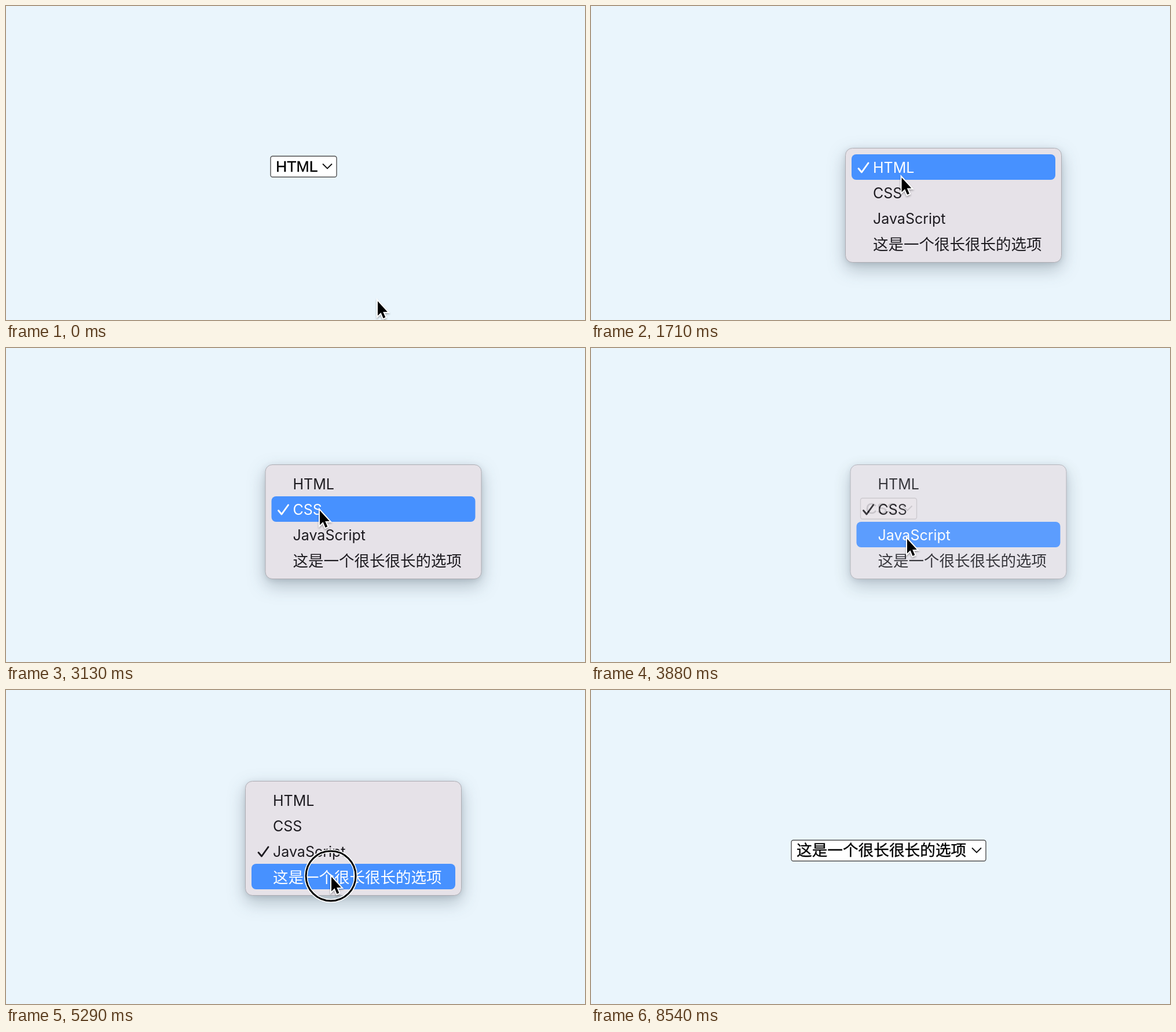
An HTML page for the animation above (8580 ms loop, 1000 px wide and 542 px high).

```html
<!DOCTYPE html>
<html lang="zh-CN">
<head>
<meta charset="utf-8">
<title>Select width</title>
<style>
  html, body { margin: 0; width: 100%; height: 100%; overflow: hidden; background: #eaf5fc; }
  svg { display: block; width: 1000px; height: 542px; }
  .box { fill: #fff; }
  .select text {
    font: 26.67px "Liberation Sans", "Noto Sans CJK SC", Arial, sans-serif;
    stroke: #000; stroke-width: .35;
  }
  .chevron { fill: none; stroke: #111; stroke-width: 1.8; }
  .ring { fill: none; stroke: #0053c3; stroke-width: 4; }
  .halo { fill: none; stroke: #fff; stroke-width: 6; }
  .panel {
    fill: #e6e2e8; stroke: #aeadb3;
    filter: drop-shadow(0 2px 4px rgba(30, 45, 60, .12)) drop-shadow(0 11px 15px rgba(30, 45, 60, .28));
  }
  .row rect { fill: none; }
  .row text { font: 25px Inter, "Noto Sans CJK SC", sans-serif; fill: #1d1b20; }
  .row text.cjk { font: 26.5px "Noto Sans CJK SC", sans-serif; }
  .row path { fill: none; stroke: #1d1b20; stroke-width: 2.9; stroke-linecap: round; stroke-linejoin: round; }
  .row.on rect { fill: #4791ff; }
  .row.on text { fill: #fff; }
  .row.on path { stroke: #fff; }
  .press { fill: none; }
  .pointer { filter: drop-shadow(0 2px 1.5px rgba(0, 0, 0, .3)); }
</style>
</head>
<body>
<svg viewBox="0 0 1000 542">
  <g class="select">
    <rect class="halo" y="260" height="34" rx="6"/>
    <rect class="box" y="259.2" height="36" rx="3.5" stroke-width="1.4"/>
    <rect class="ring" y="260" height="34" rx="5"/>
    <text y="286"></text>
    <path class="chevron" d="M-24.5 272.5l8 8 8-8"/>
  </g>
  <g id="menus"></g>
  <g id="cursor">
    <g class="press">
      <circle r="43" stroke="#fff" stroke-width="6"/>
      <circle r="43" stroke="#000" stroke-width="3"/>
    </g>
    <path class="pointer" d="M1 1.5V26.5L6.5 21.3 10.6 30.9 14.3 29.3 10.2 19.9H17.8Z"
      stroke="#fff" stroke-width="4" paint-order="stroke"/>
  </g>
</svg>
<script>
const LOOP = 8580, ROW = 44, CENTER = 514;
const options = [
  { label: 'HTML', width: 115 },
  { label: 'CSS', width: 98 },
  { label: 'JavaScript', width: 167 },
  { label: '这是一个很长很长的选项', width: 337, cjk: true }
];

// Each menu opens on the current option and fades once the next one is chosen.
const menus = [
  { open: 1160, fade: 2040 },
  { open: 2760, fade: 3855 },
  { open: 4530, fade: 5500 }
];
const FADE = 200, BLUR = 6540, HIDE = 7430;
const presses = [[1100, 1200], [1900, 1990], [2700, 2800], [3600, 3700],
  [4470, 4560], [5240, 5340], [6460, 6570]];

// Pointer moves: start, end, x, y
const START = [641, 508];
const moves = [
  [500, 1040, 529, 277],
  [1540, 1880, 542, 312],
  [2300, 2620, 541, 279],
  [3150, 3500, 545, 328],
  [4100, 4400, 553, 279],
  [4750, 5120, 561, 321],
  [5760, 6380, 705, 177],
  [6630, 7050, 791, 88]
];

const $ = selector => document.querySelector(selector);
const clamp = v => Math.min(1, Math.max(0, v));
const ease = v => v * v * (3 - 2 * v);
const within = (t, from, to) => t >= from && t < to;
const show = (node, on) => node.setAttribute('visibility', on ? 'visible' : 'hidden');
const leftOf = option => CENTER - option.width / 2;

function rowMarkup(option, index, checked) {
  const baseline = option.cjk ? 33 : 32;
  return `<g class="row" transform="translate(0 ${10 + index * ROW})">
    <rect x="10.5" width="352" height="${ROW}" rx="8"/>
    ${checked ? '<path d="M22.5 24.5l5.5 6.5 11.5-16"/>' : ''}
    <text class="${option.cjk ? 'cjk' : ''}" x="47.5" y="${baseline}">${option.label}</text>
  </g>`;
}

menus.forEach((menu, i) => {
  menu.top = 246 - i * ROW;
  $('#menus').insertAdjacentHTML('beforeend',
    `<g transform="translate(${leftOf(options[i]) - 17} ${menu.top})">
      <rect class="panel" y="-.5" width="373" height="197" rx="12"/>
      ${options.map((option, k) => rowMarkup(option, k, k === i)).join('')}
    </g>`);
  menu.node = $('#menus').lastElementChild;
  menu.rows = menu.node.querySelectorAll('.row');
});

function pointerAt(t) {
  let [x, y] = START;
  for (const [from, to, endX, endY] of moves) {
    const k = ease(clamp((t - from) / (to - from)));
    x += (endX - x) * k;
    y += (endY - y) * k;
  }
  return [x, y];
}

function drawSelect(t) {
  const chosen = menus.filter(menu => t >= menu.fade + FADE).length;
  const option = options[chosen];
  const left = leftOf(option);
  const opened = chosen < menus.length && t >= menus[chosen].open;
  const pressed = chosen < menus.length && t >= menus[chosen].open - 60;
  const ringed = chosen > 0 && !pressed && t < BLUR;

  const box = $('.box');
  box.setAttribute('x', left + .5);
  box.setAttribute('width', option.width - 1);
  box.setAttribute('stroke', opened ? '#282828' : '#505050');
  for (const node of [$('.ring'), $('.halo')]) {
    node.setAttribute('x', left + 1.5);
    node.setAttribute('width', option.width - 3);
    show(node, ringed);
  }
  const text = $('.select text');
  text.textContent = option.label;
  text.setAttribute('x', left + 9.5);
  $('.chevron').setAttribute('transform', `translate(${left + option.width} 0)`);
}

function render(t) {
  const [x, y] = pointerAt(t);
  drawSelect(t);
  for (const { node, rows, top, open, fade } of menus) {
    show(node, within(t, open, fade + FADE));
    node.setAttribute('opacity', 1 - clamp((t - fade) / FADE));
    const active = Math.floor((y - top - 10) / ROW);
    rows.forEach((row, k) => row.classList.toggle('on', k === active));
  }
  $('#cursor').setAttribute('transform', `translate(${x} ${y})`);
  $('#cursor').setAttribute('display', t < HIDE ? 'inline' : 'none');
  show($('.press'), presses.some(([from, to]) => within(t, from, to)));
}

const begin = performance.now();
function frame() {
  render((performance.now() - begin) % LOOP);
  requestAnimationFrame(frame);
}
frame();
</script>
</body>
</html>
```
